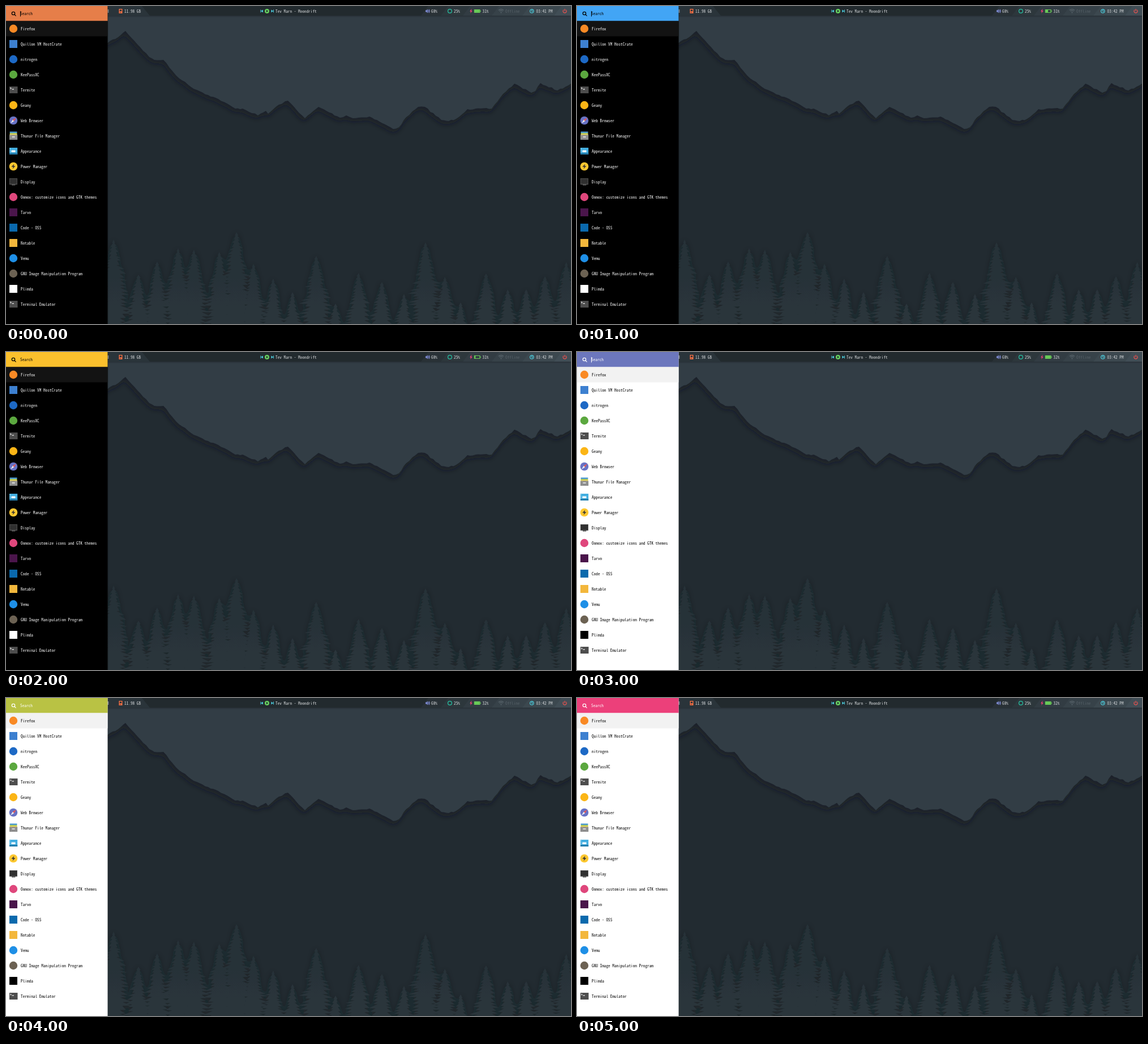
These frames come from a looping animation (998x561 px, 6 s). An HTML page:

```html
<!DOCTYPE html>
<html lang="en">
<head>
<meta charset="utf-8">
<title>Launcher themes</title>
<style>
  html, body { margin: 0; width: 100%; height: 100%; overflow: hidden; background: #222b31; }
  svg { display: block; width: 998px; height: 561px; }
  text { font-family: "Noto Sans Mono CJK JP", "Noto Sans Mono", monospace; white-space: pre; }
  #bar text { fill: #d9dcde; }
  #bar .dim { fill: #566168; }
  #panel { --paper: #000; --ink: #fff; --row: #131313; --head: #000; }
  #panel.light { --paper: #fff; --ink: #000; --row: #f2f2f2; --head: #fff; }
  #rows text { fill: var(--ink); }
  .line { fill: none; stroke-width: 1.2; }
</style>
</head>
<body>
<svg viewBox="0 0 998 561">
  <defs>
    <filter id="ridgeShadow" x="-5%" y="-5%" width="110%" height="125%">
      <feDropShadow dx="-2" dy="6" stdDeviation="5" flood-color="#12181c" flood-opacity=".55"/>
    </filter>
    <filter id="treeShadow" x="-5%" y="-10%" width="110%" height="120%">
      <feDropShadow dx="0" dy="2" stdDeviation="6" flood-color="#171e22" flood-opacity=".5"/>
    </filter>
    <filter id="edgeShadow" x="-5%" y="-20%" width="110%" height="160%">
      <feDropShadow dx="0" dy="1" stdDeviation="1.5" flood-opacity=".3"/>
    </filter>
    <linearGradient id="mist" gradientUnits="userSpaceOnUse" x1="0" y1="400" x2="0" y2="561">
      <stop stop-color="#263037"/><stop offset="1" stop-color="#2a353b"/>
    </linearGradient>
    <g id="terminal">
      <path fill="#4d4d4d" d="M-7-6H7.5V6H-7Z"/>
      <path class="line" stroke="#eee" stroke-width=".9" d="M-5.5-4l1.5 1.2-1.5 1.2M-2.5-1.2H1"/>
    </g>
    <g id="compass">
      <circle r="7.3" fill="#6772c4"/>
      <path fill="#ef5350" d="M5-5L1.2 1.2-1.2-1.2Z"/>
      <path fill="#eee" d="M-5 5L1.2 1.2-1.2-1.2Z"/>
    </g>
    <g id="cabinet">
      <path fill="#4b9ad0" d="M-6.3-7.5H6.5V-5H-6.3Z"/>
      <path fill="#b8cc55" d="M-6.3-5H6.5V-3H-6.3Z"/>
      <path fill="#e5cf62" d="M-6.5-3H6.7V-1H-6.5Z"/>
      <path fill="#8e8e8e" d="M-7-1.5H7.2V7H-7Z"/>
      <path fill="#f4f4f4" d="M-2.5 1.2H2.7V2.7H-2.5Z"/>
    </g>
    <g id="appearance">
      <path fill="#42aee0" d="M-7-6H7.2V6H-7Z"/>
      <path fill="#257fae" d="M-7 3H7.2V6H-7Z"/>
      <path fill="#fff" d="M-3.5-1.5H3.5V2H-3.5ZM-6.3-5h1v1h-1zm0 3h1v1h-1zm0 3h1v1h-1z"/>
    </g>
    <g id="power">
      <circle r="7.3" fill="#fdc830"/>
      <path fill="#333" d="M1.5-4.5L-3.6.8H-.3L-1.5 4.5 3.6-.8H.4Z"/>
    </g>
    <g id="display">
      <path fill="#555" d="M-7-6H7V5H-7ZM-3 5H3.5V6.5H-3Z"/>
      <path fill="#303030" d="M-6.2-5.2H6.2V3.8H-6.2Z"/>
    </g>
  </defs>

  <rect width="998" height="561" fill="#222b31"/>
  <path id="sky" fill="#303d44" filter="url(#ridgeShadow)"/>
  <path id="forest" fill="url(#mist)" filter="url(#treeShadow)"/>

  <g id="bar">
    <path fill="#222a2f" filter="url(#edgeShadow)" d="M0 0H998V17H0Z"/>
    <path fill="#2a343a" d="M179 0H240L254 17H179Z"/>
    <g id="segments"></g>
    <path fill="#8d9499" d="M179 6h2.3v6H179Z"/>
    <path fill="#ff7043" d="M199.5 5H205.5V13H199.5Z"/>
    <path fill="#2a343a" d="M200.8 6.2h3.4v3h-3.4zM201 10.7h1.5v1.2H201z"/>
    <path fill="#4dd0e1" d="M449.5 6.5h1v5h-1zM454 6.5v5L450.5 9zM468.5 6.5L472 9l-3.5 2.5zM472 6.5h1v5h-1z"/>
    <circle cx="461" cy="9" r="4" fill="#66d05f"/>
    <path fill="#222a2f" d="M459.8 6.8L463.2 9l-3.4 2.2Z"/>
    <path fill="#7986cb" d="M741 7.5h1.6L745 5.5v7l-2.4-2H741Z"/>
    <path class="line" stroke="#7986cb" stroke-width=".8" d="M746 7q1.5 2 0 4M747 5.8q2.2 3.2 0 6.4"/>
    <circle class="line" cx="784" cy="9" r="3.4" stroke="#26c6a7"/>
    <path fill="#ec407a" d="M822.6 4.8L819 9.4h2l-.8 3.7 3.6-4.7h-2Z"/>
    <path class="line" stroke="#68c957" stroke-width=".9" d="M827.5 6.5h9.5v5h-9.5zM838 8v2"/>
    <rect id="charge" x="828" y="7" height="4" fill="#68c957"/>
    <path class="line" stroke="#58646b" d="M870 7.5q4.5-3.8 9 0M871.6 9.4q2.9-2.4 5.8 0"/>
    <circle cx="874.5" cy="11.6" r="1.1" fill="#58646b"/>
    <circle class="line" cx="928.8" cy="9" r="3.2" stroke="#4dd0e1"/>
    <path class="line" stroke="#4dd0e1" stroke-width=".8" d="M928.8 7v2l1.5 1"/>
    <path class="line" stroke="#ef5350" d="M985.1 6.6a3.1 3.1 0 1 0 3.8 0M987 5v4"/>
    <g id="status" transform="translate(0 11.6)">
      <text x="209">11.98 GB</text>
      <text x="476">Tev Marn - Moondrift</text>
      <text x="751">68%</text>
      <text x="791">25%</text>
      <text x="841.5" id="battery"></text>
      <text x="882" class="dim">Offline</text>
      <text x="936.5" id="clock"></text>
    </g>
  </g>

  <g id="panel">
    <path fill="var(--paper)" filter="url(#edgeShadow)" d="M0 0H179.5V561H0Z"/>
    <rect id="header" width="179.5" height="26.5"/>
    <rect y="26.5" width="179.5" height="27" fill="var(--row)"/>
    <circle class="line" cx="13" cy="13" r="2.7" stroke="var(--head)"/>
    <path class="line" stroke="var(--head)" d="M15 15l2.6 2.6"/>
    <text x="25" y="16.3" fill="var(--head)">Search</text>
    <rect id="caret" x="25" y="9" width="1" height="9.5" fill="var(--head)"/>
    <g id="rows"></g>
  </g>
</svg>

<script>
const $ = id => document.getElementById(id);

// Choose the size at which one monospace cell is 3.64 px wide.
const pen = document.createElement('canvas').getContext('2d');
pen.font = '100px "Noto Sans Mono CJK JP", "Noto Sans Mono", monospace';
document.querySelector('svg').style.fontSize = 364 / pen.measureText('M').width + 'px';

const disc = color => `<circle r="7.2" fill="${color}"/>`;
const tile = color => `<rect x="-7" y="-7" width="14" height="14" fill="${color}"/>`;
const icon = id => `<use href="#${id}"/>`;

const apps = [
  ['Firefox', disc('#f98a25')],
  ['Quillon VM HostCrate', tile('#3d80d0')],
  ['nitrogen', disc('#1d69c5')],
  ['KeePassXC', disc('#5ba83f')],
  ['Termite', icon('terminal')],
  ['Geany', disc('#fbb516')],
  ['Web Browser', icon('compass')],
  ['Thunar File Manager', icon('cabinet')],
  ['Appearance', icon('appearance')],
  ['Power Manager', icon('power')],
  ['Display', icon('display')],
  ['Oomox: customize icons and GTK themes', disc('#df477c')],
  ['Tarvo', tile('#4a154b')],
  ['Code - OSS', tile('#0a69ad')],
  ['Notable', tile('#f3b73c')],
  ['Vemu', disc('#1e8fe6')],
  ['GNU Image Manipulation Program', disc('#6c6253')],
  ['Plimda', tile('var(--ink)')],
  ['Terminal Emulator', icon('terminal')],
];
$('rows').innerHTML = apps.map(([name, art], i) =>
  `<g transform="translate(13 ${40 + 27 * i})">${art}<text x="13" y="2.7">${name}</text></g>`).join('');

// Slanted status segments, each a little lighter than the one to its left.
$('segments').innerHTML = [733, 768, 807, 858, 912, 968].map((x, i) =>
  `<path fill="hsl(203 14% ${18.5 + i * 2.2}%)" d="M${x + 13} 0H998V17H${x}Z"/>`).join('');

let seed = 7;
const random = () => (seed = seed * 16807 % 2147483647) / 2147483647;
const outline = points => 'M' + points.map(p => p.map(v => v.toFixed(1)).join(' ')).join('L') + 'Z';

// The ridge is given by its main bends; small notches are added between them.
const bends = [
  [170, 69], [198, 55], [211, 44], [253, 90], [262, 95], [278, 95], [300, 122], [327, 143],
  [357, 157], [375, 164], [405, 181], [418, 181], [445, 193], [459, 185], [463, 190], [482, 174],
  [498, 167], [528, 198], [552, 178], [590, 197], [601, 193], [613, 198], [642, 195], [660, 204],
  [684, 217], [694, 214], [707, 196], [728, 178], [740, 178], [769, 201], [782, 203], [795, 199],
  [815, 182], [858, 181], [878, 155], [898, 137], [928, 153], [935, 150], [944, 136], [974, 149],
  [1003, 135],
];
const ridge = bends.flatMap(([x, y], i) => {
  const [nextX, nextY] = bends[i + 1] || [x, y];
  const steps = Math.max(1, Math.round((nextX - x) / 5));
  return Array.from({ length: steps }, (_, k) =>
    [x + (nextX - x) * k / steps, y + (nextY - y) * k / steps + (k && random() * 2.4 - 1.2)]);
});
$('sky').setAttribute('d', outline([[170, 0], ...ridge, [1003, 0]]));

// Each tier of branches reaches out, droops and returns towards the trunk.
function pine(x, top) {
  const side = dir => {
    const points = [];
    for (let y = top + 4; y < 575; y += 4 + random() * 4) {
      const reach = Math.min(27, 2 + (y - top) * .29) * (.7 + random() * .5);
      points.push([x + dir * reach, y + 2], [x + dir * reach * .5, y + 2.5]);
    }
    return points;
  };
  return outline([[x, top], ...side(1), ...side(-1).reverse()]);
}
$('forest').setAttribute('d', [
  [190, 412], [234, 474], [267, 451], [304, 427], [332, 430], [377, 434], [407, 399], [437, 455],
  [472, 481], [506, 505], [548, 441], [582, 525], [623, 471], [664, 487], [703, 508], [741, 417],
  [775, 478], [803, 523], [848, 472], [886, 500], [919, 500], [952, 477], [990, 452],
].map(tree => pine(...tree)).join(''));

const themes = [
  { color: '#e67e49', caret: true, charge: 8.5, level: 31, time: '03:41 PM' },
  { color: '#42a5f5', caret: true, charge: 4, level: 31 },
  { color: '#fbc02d', charge: 1.3, level: 31 },
  { color: '#6c77bd', caret: true, charge: 8.5, level: 32, light: true },
  { color: '#b9c244', charge: 8.5, level: 32, light: true },
  { color: '#ec407a', charge: 8.5, level: 32, light: true },
];

let shown;
function draw() {
  const theme = themes[Math.floor(performance.now() % 6000 / 1000)];
  if (theme !== shown) {
    shown = theme;
    $('panel').classList.toggle('light', !!theme.light);
    $('header').setAttribute('fill', theme.color);
    $('caret').setAttribute('opacity', theme.caret ? 1 : 0);
    $('charge').setAttribute('width', theme.charge);
    $('battery').textContent = theme.level + '%';
    $('clock').textContent = theme.time || '03:42 PM';
  }
  requestAnimationFrame(draw);
}
draw();
</script>
</body>
</html>
```
